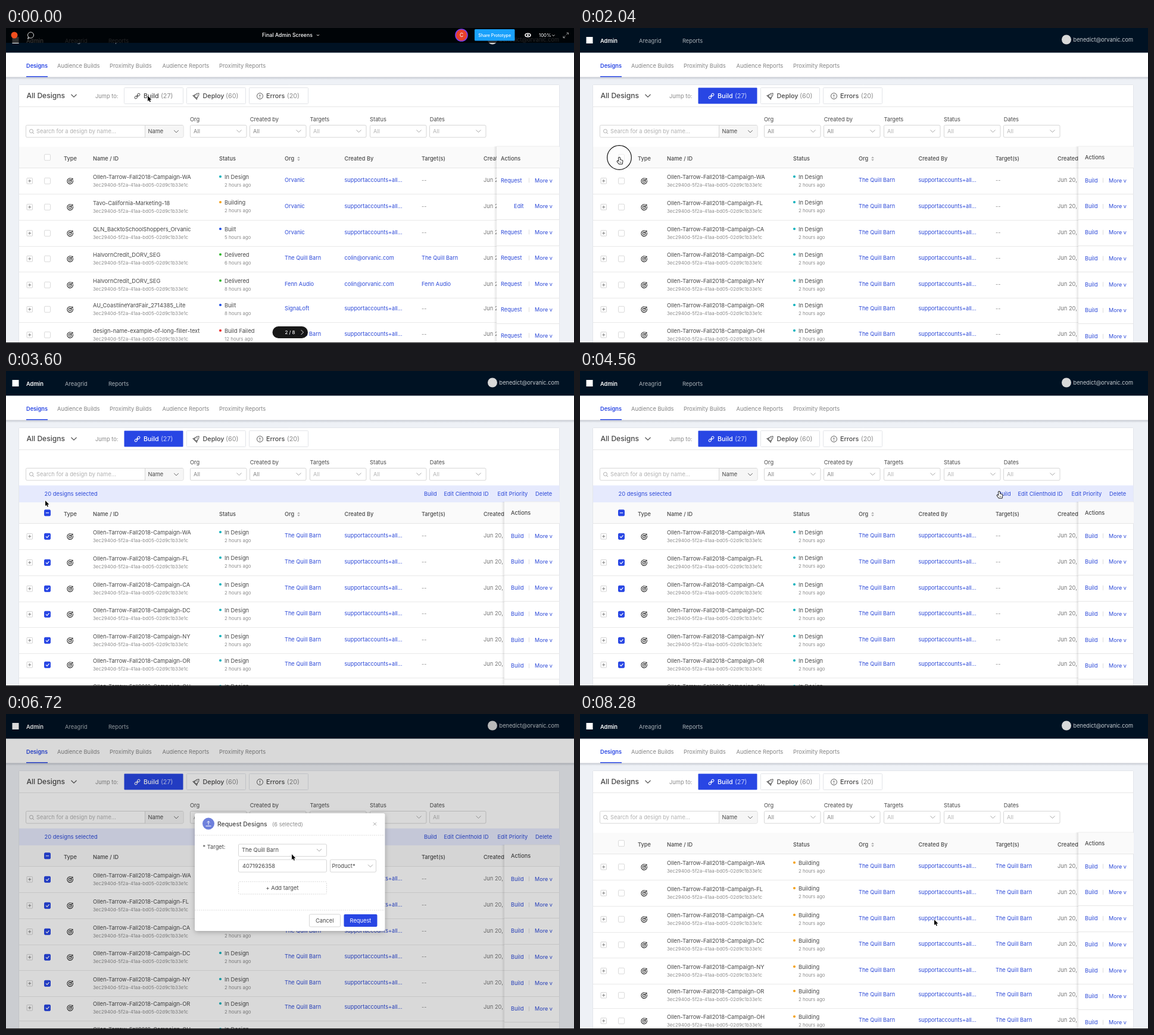
An HTML page with a canvas that plays this animation: 954 by 530 pixels, repeating every 8400 ms.

```html
<!DOCTYPE html>
<html lang="en">
<head>
<meta charset="utf-8">
<title>Admin designs</title>
<style>
html, body { margin: 0; width: 100%; height: 100%; overflow: hidden; background: #eef1f6; }
canvas { display: block; width: 954px; height: 530px; }
</style>
</head>
<body>
<canvas id="stage" width="954" height="530"></canvas>
<script>
const ctx = document.getElementById('stage').getContext('2d');
const LOOP = 8400, STEP = 120;
const BLUE = '#2846e4', LINK = '#2c49d8', INK = '#484848', GRAY = '#8b8b8b', LINE = '#e6e6e6', BORDER = '#d6d6d6';
const DESK = 'The Quill Barn', PARTNER = 'supportaccounts+all...', ID = '3ec2940d-5f2a-41aa-bd05-02d9c1b33e1c';
const ROW_Y = [250, 294, 338, 381, 425, 466, 509];
const STATUS = { 'In Design': '#12b3bd', Building: '#f5a31c', Built: '#2050e6', Delivered: '#33b830', 'Build Failed': '#ee2a2a' };

const MIXED = [
  ['Ollen-Tarrow-Fall2018-Campaign-WA', 'In Design', 2, 'Orvanic', PARTNER, '--'],
  ['Tavo-California-Marketing-18', 'Building', 2, 'Orvanic', PARTNER, '--'],
  ['QLN_BacktoSchoolShoppers_Orvanic', 'Built', 5, 'Orvanic', PARTNER, '--'],
  ['HalvornCredit_DORV_SEG', 'Delivered', 6, DESK, 'colin@orvanic.com', DESK],
  ['HalvornCredit_DORV_SEG', 'Delivered', 8, 'Fenn Audio', 'colin@orvanic.com', 'Fenn Audio'],
  ['AU_CoastlineYardFair_2714385_Lite', 'Built', 8, 'SignaLoft', PARTNER, '--'],
  ['design-name-example-of-long-filler-text', 'Build Failed', 12, DESK, PARTNER, '--']
];
const campaign = (status, target) => ['WA', 'FL', 'CA', 'DC', 'NY', 'OR', 'OH'].map(
  s => ['Ollen-Tarrow-Fall2018-Campaign-' + s, status, 2, DESK, PARTNER, target]);
const DRAFT = campaign('In Design', '--');
const SENT = campaign('Building', DESK);

const AT = { build: 480, select: 2160, modal: 4800, filled: 6000, sent: 7680 };
const CLICKS = [360, 2040, 4680, 5880, 7560];
const MOVES = [
  [0, 238, 114], [480, 238, 114], [960, 90, 213], [1320, 66, 218], [3720, 66, 218], [4560, 704, 203],
  [5280, 704, 203], [5760, 480, 236], [6840, 480, 236], [7320, 595, 346], [LOOP, 595, 346]
];

function text(s, x, y, color = INK, size = 9.3, weight = 400, align = 'left') {
  ctx.font = `${weight} ${size}px Inter, "Open Sans", sans-serif`;
  ctx.fillStyle = color;
  ctx.textAlign = align;
  ctx.fillText(s, x, y + size * 0.36);
}
function rect(x, y, w, h, color) {
  ctx.fillStyle = color;
  ctx.fillRect(x, y, w, h);
}
function box(x, y, w, h, fill, stroke, r = 2, dash = []) {
  ctx.beginPath();
  ctx.roundRect(x, y, w, h, r);
  if (fill) { ctx.fillStyle = fill; ctx.fill(); }
  if (stroke) {
    ctx.setLineDash(dash);
    ctx.strokeStyle = stroke;
    ctx.lineWidth = 1;
    ctx.stroke();
    ctx.setLineDash([]);
  }
}
function path(points, color, width = 1, fill) {
  ctx.beginPath();
  for (let i = 0; i < points.length; i += 2) ctx.lineTo(points[i], points[i + 1]);
  if (fill) ctx.closePath();
  ctx.strokeStyle = color;
  ctx.lineWidth = width;
  ctx.stroke();
  if (fill) { ctx.fillStyle = fill; ctx.fill(); }
}
function circle(x, y, r, fill, stroke, width = 1) {
  ctx.beginPath();
  ctx.arc(x, y, r, 0, Math.PI * 2);
  if (fill) { ctx.fillStyle = fill; ctx.fill(); }
  if (stroke) { ctx.strokeStyle = stroke; ctx.lineWidth = width; ctx.stroke(); }
}
function at(x, y, turn, draw) {
  ctx.save();
  ctx.translate(x, y);
  ctx.rotate(turn);
  draw();
  ctx.restore();
}
const chevron = (x, y, color, s = 4, w = 1) => path([x - s, y - s / 2, x, y + s / 2, x + s, y - s / 2], color, w);
const hline = (x, y, w, color = LINE) => rect(x, y, w, 1, color);

function drawHeader() {
  rect(10.5, 15, 11, 11, '#fff');
  const shade = ctx.createLinearGradient(0, 82, 0, 87);
  shade.addColorStop(0, 'rgba(0,10,30,.2)');
  shade.addColorStop(1, 'rgba(0,10,30,0)');
  rect(0, 82, 954, 5, shade);
  rect(0, 41, 954, 41.5, '#fff');
  rect(0, 0, 954, 41.5, '#001223');

  rect(10.5, 15, 11, 11, '#fff');
  text('Admin', 34, 21.5, '#fff', 9.3, 600);
  text('Areagrid', 99, 21.5, '#a9b0b7');
  text('Reports', 172, 21.5, '#a9b0b7');
  circle(817, 19.5, 8, '#d9d9d9');
  text('benedict@orvanic.com', 929, 19.5, '#c9ced3', 9.2, 400, 'right');

  text('Designs', 34, 64, BLUE, 9.2, 600);
  [['Audience Builds', 86], ['Proximity Builds', 174], ['Audience Reports', 262.5], ['Proximity Reports', 358]]
    .forEach(([s, x]) => text(s, x, 64, '#858585', 9.4));
  rect(34, 81, 36, 1.5, BLUE);
}

function jumpButton(x, label, labelX, count, countX, on) {
  box(x + 0.5, 100.5, 99, 27, on ? BLUE : '#fff', on ? null : '#e2e4e8', 1);
  text(label, labelX, 114.5, on ? '#fff' : INK, 10.8, 500);
  text(`(${count})`, countX, 114.5, on ? '#c6cffb' : GRAY, 10.8, 400, 'right');
}

function drawToolbar(on) {
  text('All Designs', 34.5, 114, INK, 12.1, 500);
  chevron(114, 114, '#555', 4.5, 1.2);
  text('Jump to:', 150, 115, GRAY);
  jumpButton(198, 'Build', 231, 27, 280.5, on);
  jumpButton(303, 'Deploy', 330.5, 60, 390.5);
  jumpButton(408, 'Errors', 437, 20, 493);
  at(220.5, 114.5, -Math.PI / 4, () => {
    const c = on ? '#fff' : '#555';
    box(-5.5, -1.8, 5, 3.6, null, c, 1.8);
    box(0.5, -1.8, 5, 3.6, null, c, 1.8);
    path([-2, 0, 2, 0], c);
  });
  at(320, 114, Math.PI / 4, () => {
    path([0, -6, 2.5, -2.5, 2.5, 3, -2.5, 3, -2.5, -2.5, 0, -6], '#555');
    path([-2.5, 0, -4.5, 4, 4.5, 4, 2.5, 0], '#555');
    circle(0, -1.5, 0.8, '#555');
  });
  circle(426.5, 114.5, 5, null, '#555');
  path([426.5, 111.8, 426.5, 115.2], '#555', 1.1);
  circle(426.5, 117, 0.7, '#555');
  hline(22, 132, 908);
}

function select(x, y, w, s, color) {
  box(x + 0.5, y + 0.5, w, 20.5, '#fff', BORDER);
  text(s, x + 6, y + 10.5, color);
  chevron(x + w - 12, y + 10.5, '#a5a5a5');
}

function drawFilters() {
  box(33.5, 163.5, 264.5, 20.5, '#fff', BORDER);
  rect(233.5, 164, 64, 19.5, '#f6f6f6');
  rect(233, 164, 1, 20, BORDER);
  circle(42.5, 173.5, 3, null, '#aaa');
  path([44.7, 175.7, 47, 178], '#aaa');
  text('Search for a design by name...', 51, 174, '#b0b0b0');
  text('Name', 238.5, 174, INK);
  chevron(286, 174, '#666', 3.8);
  ['Org', 'Created by', 'Targets', 'Status', 'Dates'].forEach((s, i) => {
    const x = 308.5 + i * 100.7;
    text(s, x + 0.5, 153.5);
    select(Math.round(x), 163, 94.5, 'All', i < 2 ? '#858585' : '#b5b5b5');
  });
}

function checkbox(y, mark) {
  box(64.5, y - 5, 10, 10, mark ? BLUE : '#fff', mark ? BLUE : '#dadada', 1.5);
  if (mark === 'check') path([67, y, 69, y + 2, 72.5, y - 2], '#fff', 1.2);
  if (mark === 'minus') path([66.8, y, 72.2, y], '#fff', 1.1);
}

function targetIcon(y) {
  ctx.beginPath();
  ctx.arc(107.7, y + 0.3, 4.8, -0.3, Math.PI * 2 - 1.25);
  ctx.strokeStyle = '#383838';
  ctx.lineWidth = 1.2;
  ctx.stroke();
  circle(107.7, y + 0.3, 2.2, null, '#383838', 1.1);
  path([108, y, 112.5, y - 4.5], '#383838', 1.1);
  path([110.5, y - 5, 110.5, y - 2.6, 113, y - 2.6], '#383838', 0.9);
}

function drawRow(row, y, i, picked) {
  const [name, status, hours, org, by, target] = row;
  const sy = i === 1 ? y - 1 : y;
  box(35, y + 2.5, 9.5, 9.5, '#fff', '#d4d4d4', 1);
  path([37.3, y + 7.25, 42.2, y + 7.25], '#777', 0.9);
  path([39.75, y + 4.8, 39.75, y + 9.7], '#777', 0.9);
  checkbox(y + 7.3, picked && 'check');
  targetIcon(y + 7.3);
  text(name, 146, y + 0.5);
  text(ID, 146, y + 14, GRAY, 7.9);
  circle(360, sy, 2.1, STATUS[status]);
  text(status, 367, sy + 0.5);
  text(hours + ' hours ago', 367, sy + 14, GRAY, 7.9);
  text(org, 468, y + 6, LINK, 9.2);
  text(by, 568.5, y + 6, LINK, 9.2);
  text(target, 698, y + 6, target === '--' ? GRAY : LINK, 9.2);
  text('Jun 20, 2018', 802, y + 6, '#777');
  hline(22, Math.round(y + 28.5), 908, '#e9e9e9');
}

function drawActions(first, dy) {
  const x = first ? 824 : 837, label = first ? 831 : 848;
  const shade = ctx.createLinearGradient(x - 5, 0, x, 0);
  shade.addColorStop(0, 'rgba(0,0,0,0)');
  shade.addColorStop(1, 'rgba(0,0,0,.1)');
  rect(x - 5, 199 + dy, 5, 331, shade);
  rect(x, 199 + dy, 929 - x, 331, '#fff');
  rect(x, 199 + dy, 929 - x, 36, '#fafafa');
  hline(x, 198.5 + dy, 929 - x, '#eee');
  text('Actions', label, (first ? 220 : 218) + dy, INK, 9.2, 500);
  for (let i = 0; i < 7; i++) {
    const y = 256.3 + dy + i * (first ? 43.5 : 43.75);
    hline(x, Math.round(235 + dy + i * 43.7), 929 - x);
    if (first && i === 1) text('Edit', 869.5, y, LINK, 9.2, 400, 'right');
    else text(first ? 'Request' : 'Build', label, y, LINK, 9.2);
    if (!first || i !== 1) rect(878, y - 4, 1, 8, '#ddd');
    text('More v', 888, y, LINK, 9.1);
  }
}

function drawTable(rows, first, picked) {
  const dy = picked ? 21 : 0;
  if (picked) {
    rect(22, 192.5, 907.5, 29, '#e6eafd');
    text('20 designs selected', 64.5, 206.5, LINK, 9.4);
    [['Build', 702], ['Edit Clienthold ID', 735.5], ['Edit Priority', 825.5], ['Delete', 889]]
      .forEach(([s, x]) => text(s, x, 206.5, LINK));
  }
  rect(22, 200 + dy, 908, 35, '#fafafa');
  hline(22, 235 + dy, 908);
  checkbox(217.7 + dy, picked && 'minus');
  [['Type', 97], ['Name / ID', 146], ['Status', 358], ['Org', 468], ['Created By', 568.5], ['Target(s)', 698], ['Created', 802]]
    .forEach(([s, x]) => text(s, x, 220 + dy, INK, 9.2, 500));
  path([489.5, 219 + dy, 491.5, 216.5 + dy, 493.5, 219 + dy], '#aaa', 0.3, '#aaa');
  path([489.5, 221 + dy, 491.5, 223.5 + dy, 493.5, 221 + dy], '#aaa', 0.3, '#aaa');
  rows.forEach((row, i) => drawRow(row, ROW_Y[i] + dy, i, picked));
  drawActions(first, dy);
}

function drawModal(filled) {
  rect(0, 0, 954, 530, 'rgba(0,0,0,.15)');
  ctx.save();
  ctx.translate(0, filled ? 3.5 : 0);
  ctx.shadowColor = 'rgba(0,0,0,.25)';
  ctx.shadowBlur = 9;
  ctx.shadowOffsetY = 2;
  box(317, 163.5, 319.5, 198, '#fff', null, 3);
  ctx.shadowColor = 'transparent';

  circle(340, 181, 10, '#6e80dc');
  path([340, 183, 340, 177], '#fff');
  path([337.8, 179, 340, 176.8, 342.2, 179], '#fff');
  path([335.5, 185, 344.5, 185], '#fff');
  text(filled ? 'Request Designs' : 'Build Designs', 355, 181.5, INK, 10.4, 500);
  text(filled ? '(6 selected)' : '(20 selected)', filled ? 447 : 429, 182, GRAY, 9.2);
  path([617, 179, 622, 184], '#999', 0.9);
  path([622, 179, 617, 184], '#999', 0.9);
  ctx.setLineDash([2, 1.5]);
  path([317, 200.5, 636.5, 200.5], '#dcdcdc');
  path([317, 326.5, 636.5, 326.5], '#dcdcdc');
  ctx.setLineDash([]);

  text('* Target:', 330.5, 220.5);
  select(390, 215, 148, filled ? DESK : 'Select a target', filled ? INK : GRAY);
  box(390.5, 241.5, 148, 21, '#fff', BORDER);
  text(filled ? '4071926358' : 'ID*', 397, 252, filled ? INK : GRAY);
  if (filled) {
    box(544.5, 241.5, 77, 21, '#fff', BORDER);
    text('Product*', 547.5, 252);
    chevron(612, 252, '#a5a5a5');
  }
  box(390.5, 278.5, 148, 21, '#fff', '#d8d8d8', 2, [2, 1.5]);
  text('+ Add target', 464, 289.5, INK, 9.3, 400, 'center');
  box(509.5, 333.5, 52, 21, '#fff', BORDER);
  text('Cancel', 535.3, 344.3, INK, 9.3, 400, 'center');
  box(567.5, 333.5, 56, 21, filled ? BLUE : '#233bcb');
  text('Request', 595.5, 344, '#fff', 9.3, 400, 'center');
  ctx.restore();
}

function drawViewer(alpha) {
  ctx.save();
  ctx.globalAlpha = alpha;
  rect(0, 0, 954, 25, 'rgba(0,0,0,.8)');
  circle(14, 12, 5.5, '#f24e1e');
  circle(41.5, 12, 5, null, '#ddd');
  path([37.5, 15, 36.5, 18, 39.5, 16.6], '#ddd');
  text('Final Admin Screens', 430, 12, '#fff', 8.7, 500);
  chevron(524, 12, '#ddd', 2);
  circle(765, 12, 10, '#e8412b', '#7b3ff2', 1.6);
  text('C', 765, 12, '#fff', 8.5, 400, 'center');
  box(787, 2, 67.5, 19.5, '#1aa1fb', null, 1.5);
  text('Share Prototype', 820.7, 12, '#fff', 7.1, 500, 'center');
  ctx.beginPath();
  ctx.ellipse(876.5, 12, 4.5, 2.7, 0, 0, Math.PI * 2);
  ctx.strokeStyle = '#fff';
  ctx.stroke();
  circle(876.5, 12, 1.5, '#fff');
  text('100%', 895, 12, '#fff', 7.8);
  chevron(919.5, 12.5, '#ddd', 2);
  path([941.5, 8, 944.5, 8, 944.5, 11], '#999');
  path([944.5, 8, 941, 11.5], '#999');
  path([936, 13.5, 936, 16.5, 939, 16.5], '#999');
  path([936, 16.5, 939.5, 13], '#999');
  box(447.5, 502, 59.5, 20, 'rgba(12,12,12,.95)', null, 10);
  text('2 / 8', 477, 512, '#fff', 7.9, 500, 'center');
  path([495.5, 508, 499.5, 512, 495.5, 516], '#ddd');
  ctx.restore();
}

function drawPointer(t) {
  const k = MOVES.findIndex((m, i) => i && t < m[0]);
  const [t0, x0, y0] = MOVES[k - 1], [t1, x1, y1] = MOVES[k];
  const p = (t - t0) / (t1 - t0), e = p * p * (3 - 2 * p);
  const x = x0 + (x1 - x0) * e, y = y0 + (y1 - y0) * e;
  if (CLICKS.some(c => t >= c && t < c + STEP)) circle(x, y, 20.3, 'rgba(255,255,255,.45)', '#111', 1.2);
  ctx.save();
  ctx.translate(x, y);
  ctx.lineJoin = 'round';
  if (CLICKS.some(c => t >= c - 240 && t < c + STEP)) {
    path([-1, 0.5, 0, -0.3, 1, 0.5, 1.3, 4, 4.8, 4.8, 5.5, 6, 4.8, 10.5, -0.5, 10.5, -3.5, 6.5, -2.8, 5.5, -0.6, 7], '#111', 1.8, '#fff');
    path([1.2, 7, 1.2, 9], '#111', 0.6);
    path([3, 7, 3, 9], '#111', 0.6);
  } else {
    path([0, 0, 0, 9.2, 2, 7.3, 3.5, 10.6, 5, 9.9, 3.6, 6.8, 6.4, 6.6], '#fff', 1.6, '#000');
  }
  ctx.restore();
}

function draw(t) {
  const first = t < AT.build;
  const picked = t >= AT.select && t < AT.sent;
  rect(0, 0, 954, 530, '#eef1f6');
  drawHeader();
  box(21.5, 95.5, 908, 450, '#fff', '#e3e6eb', 1);
  drawToolbar(!first);
  drawFilters();
  drawTable(first ? MIXED : t < AT.sent ? DRAFT : SENT, first, picked);
  if (t >= AT.modal && t < AT.sent) drawModal(t >= AT.filled);
  const fade = Math.max(0, Math.min(1, (600 - t) / 360));
  if (fade) drawViewer(fade);
  rect(0, 529, 954, 1, '#1c1c1c');
  drawPointer(t);
}

const start = performance.now();
function tick() {
  const t = (performance.now() - start) % LOOP;
  draw(Math.floor(t / STEP) * STEP);
  requestAnimationFrame(tick);
}
tick();
</script>
</body>
</html>
```
